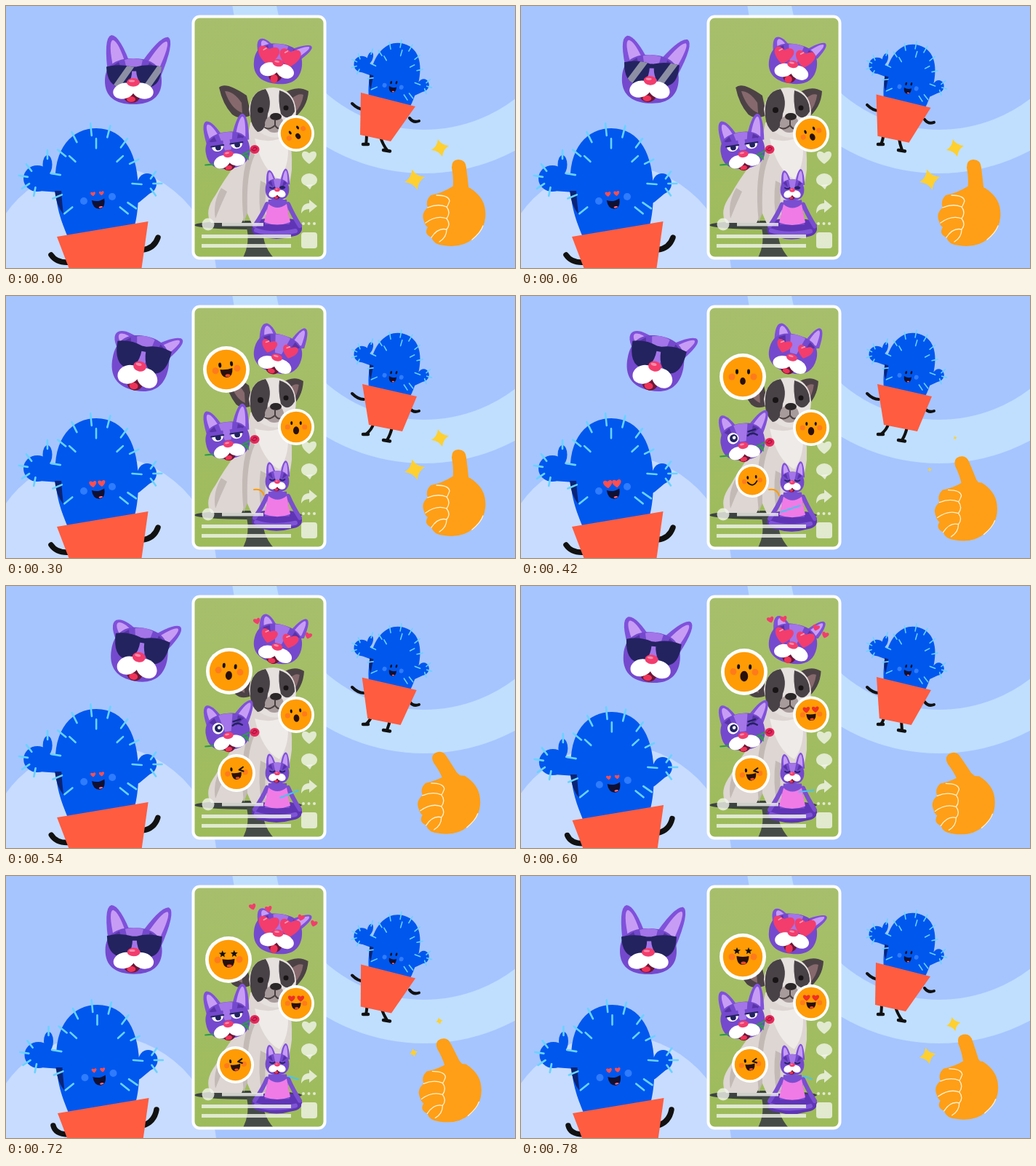
Animation, 700 px wide and 360 px high, one loop 0.84 s. Source, as an HTML page with a canvas:

```html
<!DOCTYPE html>
<html lang="en">
<head>
<meta charset="utf-8">
<title>Stickers</title>
<style>
html, body { margin: 0; width: 100%; height: 100%; overflow: hidden; background: #a6c5ff; }
canvas { display: block; }
</style>
</head>
<body>
<canvas id="stage" width="700" height="360"></canvas>
<script>
const c = document.getElementById('stage').getContext('2d');
const STEP = 60, STEPS = 14, KNOTS = [0, 3, 5, 7, 9, 11, 13];
const NAVY = '#23235f', PINK = '#f23d6d', BLUE = '#0057ee', ORANGE = '#ff9b05', POT = '#ff5c40', INK = '#111';
const HEART = 'M0 .95C-1.6-.1-.9-1.2 0-.45C.9-1.2 1.6-.1 0 .95Z';
const SPARK = 'M0-1Q.22-.26 1 0Q.26.22 0 1Q-.22.26-1 0Q-.26-.22 0-1Z';
const STAR = 'M0-1L.28-.35 1-.3 .45.15 .6.85 0 .45-.6.85-.45.15-1-.3-.28-.35Z';
let step = 0;

const mix = (a, b, u) => a + (b - a) * u;

// Linear interpolation between values placed on KNOTS
function track(...v) {
  let i = KNOTS.length - 1;
  while (KNOTS[i] > step) i--;
  if (i === KNOTS.length - 1) return v[i];
  return mix(v[i], v[i + 1], (step - KNOTS[i]) / (KNOTS[i + 1] - KNOTS[i]));
}

function fill(color, d) {
  c.fillStyle = color;
  c.fill(new Path2D(d));
}
function line(color, width, d) {
  c.strokeStyle = color;
  c.lineWidth = width;
  c.stroke(new Path2D(d));
}
function oval(color, x, y, rx, ry = rx, rot = 0) {
  c.fillStyle = color;
  c.beginPath();
  c.ellipse(x, y, rx, ry, rot, 0, 7);
  c.fill();
}
function at(x, y, rot, sx, sy, draw) {
  c.save();
  c.translate(x, y);
  c.rotate(rot);
  c.scale(sx, sy);
  draw();
  c.restore();
}
const stamp = (color, d, x, y, r, rot = 0) => at(x, y, rot, r, r, () => fill(color, d));

function background() {
  c.fillStyle = '#a6c5ff';
  c.fillRect(0, 0, 700, 360);
  oval('#c8dcff', 130, 378, 160);
  c.strokeStyle = '#c0dfff';
  c.lineWidth = 60;
  c.beginPath();
  c.arc(575, -36, 236, 0, 7);
  c.stroke();
}

function puppy(swing) {
  oval('#3d4340', 333, 301, 74, 6);
  fill('#454c47', 'M331 304H355Q350 325 368 346H326Q336 325 331 304Z');
  at(357, 145, 0, mix(1, .88, swing), 1, () => {
    fill('#4c4246', 'M-64-33Q-55-42-26-22L-20 5Q-36 12-46 4Q-59-10-64-33ZM24-25Q44-37 59-28Q58-6 38 10Z');
    fill('#86696c', 'M-56-28Q-44-28-33-12L-32 2Q-48-4-56-28ZM36-18Q46-26 52-23Q50-8 40 2Z');
  });
  fill('#ddd6d2', 'M336 160Q330 195 318 215Q300 238 288 260Q272 282 282 298H324L331 283 338 299H364Q388 270 393 225Q394 195 388 160Z');
  fill('#c3bab6', 'M336 195Q320 235 327 297L332 284Q330 230 342 205ZM296 250Q284 270 288 292Q295 274 304 255ZM350 240Q346 270 352 298L358 297Q354 265 360 245Z');
  fill('#efebe8', 'M342 182Q365 190 386 178Q393 215 376 238Q352 226 342 182Z');
  fill('#e6e0de', 'M334 142Q338 112 368 112Q397 114 399 145Q398 179 370 181Q338 178 334 142Z');
  fill('#484146', 'M336 152Q333 118 357 114Q367 130 360 148Q358 172 346 173Q337 165 336 152ZM376 116Q397 122 397 145Q388 160 378 148Q374 130 376 116Z');
  oval('#a89b9b', 369, 162, 13, 12);
  oval('#2b2628', 371, 152, 8, 5);
  line('#4a3f40', 2, 'M370 157V164Q362 171 356 167M370 164Q375 172 381 166');
  oval('#181416', 350, 143, 4);
  oval('#181416', 385, 140, 3.5);
}

function overlay() {
  c.globalAlpha = .8;
  const white = '#f2f5ec';
  stamp(white, HEART, 417, 207, 10.5);
  oval(white, 417, 239, 11, 9);
  fill(white, 'M412 246L418 252 422 245ZM417 266L428 275 417 284V279Q409 279 406 285Q406 271 417 271Z');
  for (const x of [409, 416.5, 424]) oval(white, x, 299, 2);
  oval(white, 278, 300, 8.5);
  c.fillStyle = white;
  c.beginPath();
  c.roundRect(406, 311, 22, 22, 4);
  c.fill();
  c.fillRect(297, 298, 57, 4.5);
  c.fillRect(269, 314, 123, 5);
  c.fillRect(269, 327, 123, 5);
  c.globalAlpha = 1;
}

function dog({ ear = 1, turn = [0, 0], face = 0, tongue = 0, eyes }) {
  at(-18, -18, turn[0], 1, ear, () => {
    fill('#8051da', 'M-16 14Q-24-44-12-47Q0-47 16 0Z');
    fill('#c79cf4', 'M-9 2Q-17-38-10-40Q-2-38 8-4Z');
  });
  at(22, -18, turn[1], 1, ear, () => {
    fill('#8051da', 'M-16 0Q14-46 26-44Q36-38 15 14Z');
    fill('#c79cf4', 'M-5-4Q16-38 24-38Q29-34 12 4Z');
  });
  fill('#7549cd', 'M-39 0C-39-22-25-32 0-32C25-32 39-22 39 0C39 22 25 33 0 33C-25 33-39 22-39 0Z');
  fill('#a375e8', 'M-12-30Q0-34 13-30L6 0H-5Z');
  fill('#5933a8', 'M-30-20L-20-27-14-8ZM32-19L22-26 16-8Z');
  eyes();
  at(0, face, 0, 1, 1, () => {
    oval('#6d1738', -2, 21, 11, 9 + tongue / 4);
    oval('#ee3358', -3, 25 + tongue / 4, 6, 4 + tongue / 3);
    oval('#fff', -13, 13, 15, 11, -.3);
    oval('#fff', 13, 13, 15, 11, .3);
    oval('#fff', 0, 7, 10, 9);
  });
  oval(PINK, 0, 1 + face, 9, 6);
  oval('#ff8bab', -2, face - 1, 4, 1.6);
}

function coolDog(swing) {
  at(mix(175, 185, swing), mix(103, 92, swing), .2 * swing, 1, mix(.97, 1.17, swing), () => dog({
    ear: mix(1, .45, swing), turn: [-.5 * swing, 0], face: mix(1, 3, swing),
    eyes() {
      const lenses = new Path2D('M-37-20Q-20-25-2-20Q0 4-16 9Q-36 8-37-20ZM4-20Q20-25 39-20Q38 8 20 9Q3 4 4-20ZM-4-20H6V-14H-4Z');
      c.fillStyle = NAVY;
      c.fill(lenses);
      if (step > 4) return;
      c.save();
      c.clip(lenses);
      for (const x of [-18, 24]) line('#8d8fa5', 9, `M${x + 18 - step * 7}-26l-26 38`);
      c.restore();
    }
  }));
}

function loveDog(swing) {
  at(374, 79, mix(.13, .27, swing), .85, mix(.85, .82, swing), () => dog({
    ear: mix(.4, .55, swing), turn: [0, -.6 * swing], face: mix(-2, 6, swing), tongue: mix(9, 0, swing),
    eyes() {
      for (const x of [-17, 18]) {
        const r = mix(18, 13, swing);
        stamp(PINK, HEART, x, mix(-13, -9, swing), r);
        line('#ff9db8', 2, `M${x - r * .5} ${mix(-19, -13, swing)}l4-3`);
      }
    }
  }));
  if (step > 7 && step < 13) {
    const k = (step - 7) / 4;
    stamp(PINK, HEART, 349 - 8 * k, 52 - 8 * k, 5, -.3);
    stamp(PINK, HEART, 411 + 10 * k, 70 - 4 * k, 5, .3);
    if (step > 9) {
      stamp(PINK, HEART, 361, 45, 5, -.2);
      stamp(PINK, HEART, 406, 57, 5, .3);
    }
  }
}

function roseDog() {
  const wink = step > 5 && step < 12;
  const dy = wink ? 2 : 0;
  at(305, 198 + dy, -.15, .78, .78, () => dog({
    ear: wink ? .7 : .8, turn: [0, wink ? 0 : -.35], face: 6,
    eyes() {
      line('#2f9a4b', 2.6, 'M-43 20Q-10 24 42 6');
      if (wink) {
        oval('#fff', -16, -8, 10);
        oval(NAVY, -15, -8, 7);
        oval('#fff', -14, -9, 3);
        line(NAVY, 3, 'M10-9Q18-15 27-8M12-16L25-18');
        return;
      }
      for (const x of [-17, 17]) {
        oval('#fff', x, -8, 10, 8);
        oval(NAVY, x + 1, -7, 5);
        fill('#7549cd', `M${x - 11}-10H${x + 11}V-18H${x - 11}Z`);
        line(NAVY, 2.5, `M${x - 11}-10H${x + 11}`);
      }
    }
  }));
  fill('#2f9a4b', `M326 ${205 + dy}l8 7-1-8z`);
  oval('#e6285b', 342, 197 + dy * 2, 6.5, 6);
  line('#a6123f', 1.3, `M338 ${197 + dy * 2}q4 4 7-1q-3-4-5 0`);
}

function yogaDog() {
  at(0, step * .55, 0, 1, 1, () => {
    fill('#5f35b5', 'M372 298Q350 284 339 304Q336 315 352 317Q372 323 392 317Q408 315 407 304Q396 284 372 298Z');
    line('#7a4ed0', 6, 'M359 272Q353 286 342 302M388 272Q394 286 404 302');
    fill('#7a4ed0', 'M361 266H386L390 300H356Z');
    fill('#f07be6', 'M361 272Q373 282 386 272L391 297Q373 304 355 297Z');
    line('#7f55d6', 6, 'M344 308Q365 316 398 309');
    at(373, 252, 0, .42, .45, () => dog({
      ear: .85, turn: [.1, -.5],
      eyes() {
        line(NAVY, 4, 'M-24-6Q-16 0-8-6M9-6Q17 0 25-6');
        if (step < 3) oval(NAVY, 17, -6, 8, 5);
      }
    }));
  });
  if (step > 3 && step < 8) line(ORANGE, 2, 'M341 266Q352 264 355 274');
  if (step > 6) {
    const x = track(0, 0, 0, 357, 377, 388, 388);
    line('#49c3ee', 2, `M${x} ${track(0, 0, 0, 297, 291, 275, 275)}l${track(0, 0, 0, 27, 25, 16, 12)} ${track(0, 0, 0, -9, -10, 5, 4)}`);
  }
}

function emoji(x, y, r, rot, mood, open = 1) {
  oval('#fff', x, y, r);
  oval(ORANGE, x, y, r * .85);
  at(x, y, rot, r / 32, r / 32, () => {
    oval('#ff7a1c', -15, 0, 4.5);
    oval('#ff7a1c', 15, 0, 4.5);
    for (const ex of [-8, 8]) {
      if (mood === 'hearts') stamp('#ee3024', HEART, ex, -9, 6.5);
      else if (mood === 'stars') stamp(INK, STAR, ex, -8, 5);
      else if (mood === 'wink' && ex > 0) line(INK, 2.5, 'M12-9L5-5 12-2');
      else oval(INK, ex, -7, 2, 3.4);
    }
    if (mood === 'o') oval('#28110c', 0, 6, 4.5 * open, 6 * open);
    else if (mood === 'grin') line(INK, 2.5, 'M-9 2Q0 14 9 1');
    else {
      fill('#28110c', 'M-8.5-1Q0 1 8.5-1Q8 11 0 11Q-8 11-8.5-1Z');
      oval('#e64b28', 1, 8.5, 3.5, 2);
    }
  });
}

function emojis() {
  const loved = step > 9;
  emoji(399, track(175, 177, 180, 181, 177, 176, 174), 25, track(-.6, 0, 0, 0, -.1, 0, 0), loved ? 'hearts' : 'o', track(.9, 1.3, 1.15, 1.2, 1.1, 1, 1));
  if (step > 1) {
    const mood = step < 6 ? 'smile' : step < 12 ? 'o' : 'stars';
    emoji(track(303, 303, 303, 305, 307, 307, 305), track(106, 104, 101, 111, 117, 119, 111),
      track(0, 14, 32, 32, 32, 32, 32), track(0, 0, -.12, 0, .1, -.05, 0), mood, track(1, 1, 1, .85, 1, 1.4, 1));
  }
  if (step > 5) {
    emoji(track(318, 318, 318, 318, 317, 316, 315), track(254, 254, 254, 254, 257, 260, 259),
      track(0, 0, 0, 23, 26, 26, 25), -.1, step < 8 ? 'grin' : 'wink');
  }
}

function phone(swing) {
  const frame = new Path2D();
  frame.roundRect(257.5, 14.5, 181, 332, 9);
  c.save();
  c.clip(frame);
  const green = c.createLinearGradient(0, 15, 0, 346);
  green.addColorStop(0, '#a7bf6c');
  green.addColorStop(1, '#9dbb5a');
  c.fillStyle = green;
  c.fillRect(256, 13, 184, 335);
  puppy(swing);
  c.restore();
  c.strokeStyle = '#fff';
  c.lineWidth = 4;
  c.stroke(frame);
  yogaDog();
  overlay();
  loveDog(swing);
  emojis();
  roseDog();
}

// Spikes around an ellipse, pointing outwards, between two turns
function spikes(x, y, rx, ry, n, from, to, inner = .87, outer = 1.1) {
  let d = '';
  for (let i = 0; i < n; i++) {
    const a = mix(from, to, i / (n - 1)) * Math.PI * 2, ux = Math.cos(a) * rx, uy = Math.sin(a) * ry;
    d += `M${x + ux * inner} ${y + uy * inner}L${x + ux * outer} ${y + uy * outer}`;
  }
  line('#67d3ff', 2.6, d);
}

function cactus(eyes) {
  line(BLUE, 24, 'M-78 2L-50 4M70 5L52 20');
  oval(BLUE, -81, -3, 19, 18);
  oval(BLUE, -67, -22, 6.5, 13);
  oval(BLUE, 70, 4, 13, 14);
  fill(BLUE, 'M-56 10C-60-46-32-72 0-72C40-72 58-35 58 15C58 50 52 70 45 80H-38C-46 60-55 40-56 10Z');
  fill('#0b2474', 'M-57 14H-48Q-47 30-45 46Q-55 34-57 14Z');
  spikes(0, 0, 57, 72, 10, .45, 1.08);
  spikes(0, 0, 57, 72, 3, .6, .9, .62, .8);
  spikes(0, 10, 54, 60, 2, .1, .4, .75, 1);
  spikes(-81, -3, 19, 18, 4, .28, .65, .7, 1.35);
  spikes(70, 4, 14, 14, 3, -.15, .15, .6, 1.45);
  line('#67d3ff', 2.6, 'M-67-42V-30');
  oval('#2f7cff', -17, 28, 5);
  oval('#2f7cff', 22, 22, 5);
  eyes();
  at(3, 29, -.15, 1.1, 1.1, () => {
    fill('#101032', 'M-8-3Q0 1 8-3Q8 9 0 9Q-8 8-8-3Z');
    oval('#ff6a7c', 2, 7, 2.5, 1.2);
  });
}

function bigCactus() {
  const drop = track(0, 0, 0, 0, 1, 9, 9), u = drop / 9;
  at(124 + 1.5 * u, 240 + drop, 0, 1, 1, () => cactus(() => {
    const r = track(3.5, 5.3, 5.3, 6.5, 3.7, 3.2, 4);
    stamp('#ff4e4e', HEART, -4 - r * .1, 18, r, -.1);
    stamp('#ff4e4e', HEART, 7 + r * .1, 17, r, -.1);
  }));
  line(INK, 7.5, `M89 ${352 + 3 * u}Q${70 - 2 * u} ${354 + 2 * u} ${62 + 3 * u} ${342 + u}M188 ${335 + 8 * u}Q204 ${333 + 5 * u} ${209 - 2 * u} ${318 + 3 * u}`);
  at(u, drop, 0, 1, 1, () => fill(POT, 'M70 317L195.500 296 186 364H88Z'));
}

function smallCactus(swing) {
  const dy = track(0, 5.5, 0, 0, 5, 5, 0);
  const lean = (a, b) => mix(a, b, swing);
  line(INK, 4, `M${lean(496, 506)} 174Q${lean(496, 503)} 184 495 190M${lean(515, 531)} 180Q${lean(518, 529)} 190 524 198`);
  line(INK, 4.500, 'M491 190H498M519 198L528 199.500');
  at(535, 95 + dy, .28, .59, .62, () => cactus(() => {
    oval(INK, -4, 18, 2.2, 3.6);
    oval(INK, 8, 15, 2.2, 3.6);
  }));
  at(0, dy, 0, 1, 1, () => {
    line(INK, 4, 'M492 142Q484 142 476 134M555 154Q560 161 568 158');
    fill(POT, `M${lean(488, 490)} ${lean(119, 121)}L${lean(563, 565)} 138 ${lean(529, 545)} 186 ${lean(487, 499)} 177Z`);
  });
}

function thumb() {
  const u = track(0, 0, 0, .55, .9, 1, .4);
  at(-8 * u, 12 * u, 0, 1, 1, () => {
    at(626, 266, -.5 * u, 1, 1, () => fill('#ff9f17', 'M-16-2Q-8-16-13-44Q-13-55-4-55Q6-55 7-44Q9-28 10-18L18 2Z'));
    fill('#ff9f17', 'M614 248Q600 257 584 260Q576 268 580 277Q570 285 575 296Q576 301 580 304Q574 313 585 318Q588 328 602 329Q628 333 643 319Q662 304 659 280Q657 262 638 250Z');
    line('#fff0d0', 1.3, 'M580 277Q594 271 606 276M577 298Q592 287 606 292M585 318Q594 304 606 307M592 260Q609 260 610 268Q607 276 606 276Q612 284 606 292Q612 300 606 307Q606 318 596 324M641 321Q653 311 656 302');
  });
  const size = track(1, 1, 1, .2, 0, 0, .8), y = track(0, 0, 0, 0, 0, 0, 8.500);
  if (size) {
    stamp('#ffd02f', SPARK, 597 - y / 4, 195 + y, 12.5 * size, -.25);
    stamp('#ffd02f', SPARK, 562 - y / 3, 238.5 + y, 14.5 * size, -.25);
  }
}

function frame(now) {
  step = Math.floor(now / STEP) % STEPS;
  const swing = track(0, .85, 1, 1, .85, .12, 0);
  c.lineCap = c.lineJoin = 'round';
  background();
  bigCactus();
  coolDog(swing);
  phone(swing);
  smallCactus(swing);
  thumb();
  requestAnimationFrame(frame);
}
requestAnimationFrame(frame);
</script>
</body>
</html>
```
